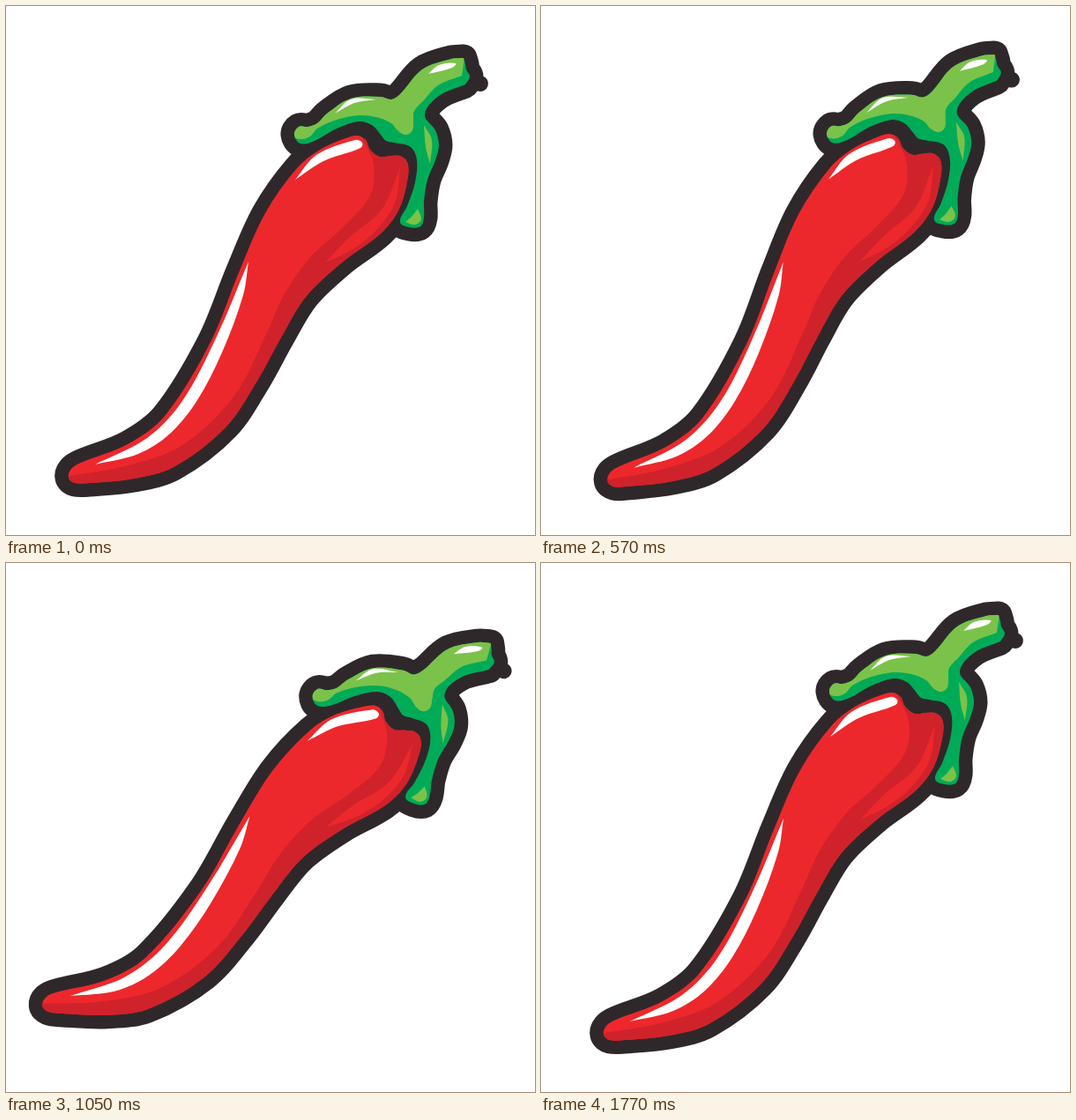
An HTML page with a canvas for the animation above (1.8 s loop, 600 by 600 pixels).

```html
<!DOCTYPE html>
<html lang="en">
<head>
<meta charset="utf-8">
<title>Chili pepper</title>
<style>
  html, body { margin: 0; width: 100%; height: 100%; overflow: hidden; background: #fff; }
  canvas { display: block; width: 100vw; height: 100vh; }
</style>
</head>
<body>
<canvas id="stage"></canvas>
<script>
  const canvas = document.getElementById('stage');
  const ctx = canvas.getContext('2d');
  const INK = '#2f282b', RED = '#ed282c', SHADE = '#d0222a';
  const GREEN = '#00ab57', LIME = '#7bc24a', WHITE = '#fff';

  // Closed smooth curve through "x,y" points; a trailing * makes a corner.
  function curve(text) {
    const pts = text.trim().split(/\s+/).flatMap(s => {
      const p = s.replace('*', '').split(',').map(Number);
      return s.endsWith('*') ? [p, p] : [p];
    });
    const n = pts.length, path = new Path2D();
    const at = i => pts[(i + n) % n];
    const dist = (a, b) => Math.hypot(b[0] - a[0], b[1] - a[1]);
    const handle = (i, len) => {
      const a = at(i - 1), b = at(i + 1), k = len / (dist(a, b) || 1);
      return [(b[0] - a[0]) * k, (b[1] - a[1]) * k];
    };
    path.moveTo(...pts[0]);
    for (let i = 0; i < n; i++) {
      const p = at(i), q = at(i + 1), len = dist(p, q) / 3;
      const u = handle(i, len), v = handle(i + 1, len);
      path.bezierCurveTo(p[0] + u[0], p[1] + u[1], q[0] - v[0], q[1] - v[1], q[0], q[1]);
    }
    path.closePath();
    return path;
  }

  const body = curve(`71,535 78,541 95,541 145,536 190,523 249,478 285,425 312,376
    340,330 381,291 425,258 446,230 456,193 455,177 447,170 436,170 424,171 413,163
    408,152 399,147 385,150 356,163 330,184 294,235 265,300 232,381 180,465 138,497
    85,518 74,525`);

  const calyx = curve(`327,146 332,137 342,137 353,133 364,122 391,105 425,103 437,106
    447,100 472,72 505,60 519,59* 521,66 522,72 526,80 521,89* 491,102 475,123 487,141
    491,158 487,175 478,197 474,222 474,240 470,250 458,251 447,245 455,227 464,200
    466,175 459,160 440,155 431,153 425,146 415,135 400,131 375,139 350,153 334,156`);

  const shade = curve(`404,150* 417,180 413,215 381,252 345,285 315,328 296,370 259,442
    200,498 135,522 65,534* 90,560 200,550 330,470 480,300 480,150*`);

  const glow = curve('447,184* 426,231 390,262 362,291* 393,276 420,254 441,223');

  const stemLight = curve(`517,79* 490,90 473,108 463,119 462,130 461,141 454,146 445,142
    437,133 420,126 400,124 375,129 353,139 346,147 337,151 328,150* 310,130* 400,85
    440,85 500,40 521,52*`);

  const drops = [
    '474,135* 483,152 481,179* 476,160',
    '467,230* 471,242 464,248 453,245* 460,239'
  ].map(curve);

  const shines = [
    '479,77* 491,67 510,65 506,70',
    '373,122* 391,106 420,106* 395,110',
    '328,197* 352,169 396,152 404,155 402,161 360,176',
    '275,290* 269,328 245,393 217,447 186,485 150,508 101,520* 160,490 200,448 238,377'
  ].map(curve);

  function fill(color, ...paths) {
    ctx.fillStyle = color;
    paths.forEach(p => ctx.fill(p));
  }

  function inside(mask, paint) {
    ctx.save();
    ctx.clip(mask);
    paint();
    ctx.restore();
  }

  function drawPepper() {
    ctx.strokeStyle = INK;
    ctx.lineJoin = ctx.lineCap = 'round';
    ctx.lineWidth = 31;
    ctx.stroke(body);
    ctx.stroke(calyx);
    ctx.lineWidth = 18;
    ctx.stroke(new Path2D('M520 82L538 88'));

    fill(RED, body);
    inside(body, () => { fill(SHADE, shade); fill(RED, glow); });
    fill(GREEN, calyx);
    inside(calyx, () => fill(LIME, stemLight));
    fill(LIME, ...drops);
    fill(WHITE, ...shines);
  }

  const LOOP = 1800, STEP = 30;
  // [time in ms, angle in degrees], straight swings in between
  const swing = [[0, 0], [300, 7.8], [750, -7], [1050, 7.8], [1500, -7], [1770, 0], [1800, 0]];

  function angleAt(t) {
    const i = swing.findIndex(([end]) => t < end);
    const [t0, a0] = swing[i - 1], [t1, a1] = swing[i];
    return a0 + (a1 - a0) * (t - t0) / (t1 - t0);
  }

  function draw() {
    const t = Math.floor((performance.now() % LOOP) / STEP) * STEP;
    const w = Math.round(innerWidth * devicePixelRatio);
    const h = Math.round(innerHeight * devicePixelRatio);
    if (canvas.width !== w || canvas.height !== h) {
      canvas.width = w;
      canvas.height = h;
    }
    const scale = Math.min(w, h) / 600;
    ctx.setTransform(1, 0, 0, 1, 0, 0);
    ctx.clearRect(0, 0, w, h);
    ctx.translate(w / 2, h / 2);
    ctx.scale(scale, scale);
    ctx.rotate(angleAt(t) * Math.PI / 180);
    ctx.translate(-300, -300);
    drawPepper();
    requestAnimationFrame(draw);
  }
  draw();
</script>
</body>
</html>
```
